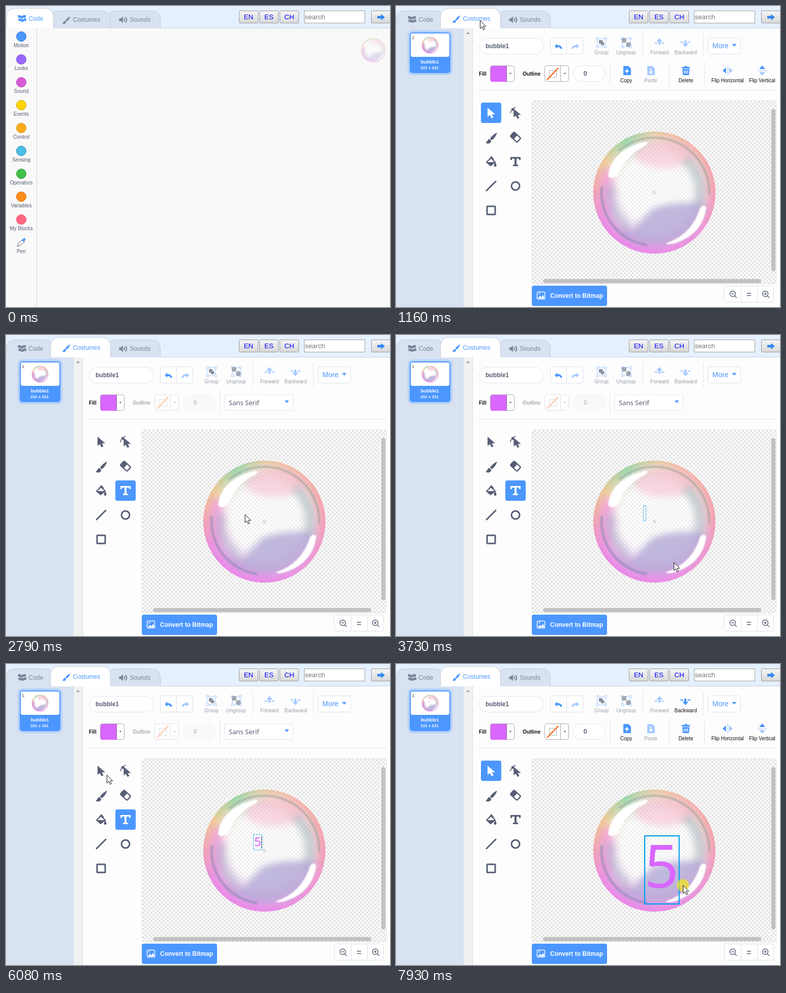
Animation of 755x592 px, one loop 8000 ms. Source, as an HTML page:

```html
<!DOCTYPE html>
<html lang="en">
<head>
<meta charset="utf-8">
<title>Costume editor</title>
<style>
  html, body { margin: 0; width: 100%; height: 100%; overflow: hidden; background: #fff; }
  svg { display: block; font-family: "Liberation Sans", Arial, sans-serif; white-space: pre; }
  .noto { font-family: "Noto Sans", "Open Sans", sans-serif; }
</style>
</head>
<body>
<svg id="stage" width="755" height="592" viewBox="0 0 755 592">
  <defs id="defs"></defs>
  <g id="page"></g>
  <g id="live"></g>
</svg>
<script>
const LOOP = 8000, BLUE = '#4c97ff', INK = '#575e75', PALE = '#a6cbff', PURPLE = '#d966ff', SELECT = '#009ff0';
const $ = id => document.getElementById(id);

// Markup helpers
const rect = (x, y, w, h, r, fill, stroke = 'none', more = '') =>
  `<rect x="${x}" y="${y}" width="${w}" height="${h}" rx="${r}" fill="${fill}" stroke="${stroke}" ${more}/>`;
const circle = (x, y, r, fill, stroke = 'none', width = 1) =>
  `<circle cx="${x}" cy="${y}" r="${r}" fill="${fill}" stroke="${stroke}" stroke-width="${width}"/>`;
const path = (d, fill, more = '') => `<path d="${d}" fill="${fill}" ${more}/>`;
const line = (d, stroke, width = 1, more = '') => path(d, 'none', `stroke="${stroke}" stroke-width="${width}" ${more}`);
const text = (x, y, s, size, fill, more = '') => `<text x="${x}" y="${y}" font-size="${size}" fill="${fill}" ${more}>${s}</text>`;
const at = (x, y, body, scale = 1, more = '') => `<g transform="translate(${x} ${y}) scale(${scale})" ${more}>${body}</g>`;
const MID = 'text-anchor="middle"', BOLD = 'font-weight="bold"';
const dashes = d => line(d, '#d0d4dc', 1, 'stroke-dasharray="3 2"');
const down = (x, y, w, fill) => path(`M${x - w} ${y - w / 2}h${2 * w}l${-w} ${w * 1.1}z`, fill);

// Bubble, centred on 0,0 with radius 120
const polar = (r, deg) => {
  const a = deg * Math.PI / 180;
  return `${(r * Math.cos(a)).toFixed(1)} ${(r * Math.sin(a)).toFixed(1)}`;
};
const arc = (r, a, b) => `M${polar(r, a)}A${r} ${r} 0 0 1 ${polar(r, b)}`;

function bubble() {
  const rim = ['#e9c39c', '#f4ae98', '#f39fa4', '#f29bb4', '#ee94cf', '#ea92e2',
    '#e98ee8', '#ea8ae8', '#ea8ee2', '#f0a2ae', '#efc690', '#92d3a0'];
  let wheel = '';
  for (let i = 0; i < 120; i++) {
    const k = Math.floor(i / 10), mix = 100 - i % 10 * 10;
    wheel += `<path d="${arc(120, i * 3 - 90, i * 3 - 86)}L0 0z" style="fill:color-mix(in srgb,${rim[k]} ${mix}%,${rim[(k + 1) % 12]})"/>`;
  }
  return `<g mask="url(#rim)">${wheel}</g>
    <g clip-path="url(#disc)"><g filter="url(#soft)">
      ${path('M-82 0a82 82 0 1 1 164 0a82 82 0 1 1 -164 0', '#fff', 'opacity=".45"')}
      <ellipse cx="22" cy="-76" rx="62" ry="28" fill="#f8b4cc" opacity=".5"/>
      <ellipse cx="-93" cy="0" rx="14" ry="48" fill="#ee86e8" opacity=".55"/>
      ${line(arc(90, -48, 22), '#9fc3c6', 20, 'opacity=".55"')}
      ${line(arc(86, 125, 190), '#b0b2cc', 22, 'opacity=".55"')}
      ${path('M-48 76L-5 32Q40 14 100 22Q84 92 10 104Q-46 104 -75 72z', '#b3a8d6', 'opacity=".8"')}
    </g><g filter="url(#thin)">
      ${line(arc(108, -130, 2), '#8c9a92', 4, 'opacity=".5"')}
      ${line(arc(104, 98, 186), '#7f8aa8', 5, 'opacity=".5"')}
      ${path('M-91-32Q-85-84-18-100Q-9-99-18-92Q-55-75-71-35Q-82-24-91-32z', '#fff')}
      ${path('M22 100Q74 83 90 30Q98 21 102 30Q95 80 45 98Q28 104 22 100z', '#fff')}
    </g></g>`;
}

$('defs').innerHTML = `
  <pattern id="checker" x="4" y="7" width="8" height="8" patternUnits="userSpaceOnUse">
    <path d="M0 0h8v8H0z" fill="#fff"/><path d="M0 0h4v8h4V4H0z" fill="#e4e4e4"/></pattern>
  <pattern id="dots" x="80" y="57" width="27" height="27" patternUnits="userSpaceOnUse">
    <path d="M0 0h2v1H0z" fill="#dedede"/></pattern>
  <linearGradient id="button" x2="0" y2="1"><stop stop-color="#f6f6f6"/><stop offset="1" stop-color="#d8d8d8"/></linearGradient>
  <radialGradient id="fade" gradientUnits="userSpaceOnUse" cx="3" cy="-8" r="130">
    <stop offset=".5" stop-color="#000"/><stop offset=".72" stop-color="#666"/>
    <stop offset=".85" stop-color="#ddd"/><stop offset=".95" stop-color="#fff"/></radialGradient>
  <mask id="rim" maskUnits="userSpaceOnUse" x="-122" y="-122" width="244" height="244">${circle(0, 0, 122, 'url(#fade)')}</mask>
  <clipPath id="disc">${circle(0, 0, 120, '#000')}</clipPath>
  <filter id="soft"><feGaussianBlur stdDeviation="7"/></filter>
  <filter id="thin"><feGaussianBlur stdDeviation="1.2"/></filter>
  <g id="bubble">${bubble()}</g>`;
const BUBBLE = '<use href="#bubble"/>';

// Icons
const blockRow = 'h4l2 1.5h3l2-1.5h4.5v5h-4.5l-2 1.5h-3l-2-1.5h-4z';
const codeIcon = c => path('M0 0' + blockRow, c) + path('M1 6.6' + blockRow, c);
const brushIcon = c => path('M15.6.4C12 2 7.3 6 6.2 8.6l2 2C11 9.5 15 4 15.6.4z', c) +
  path('M5.4 9.2c-3.2 0-2.4 4-5.4 5 3 2 7.6 1 7.7-2.6z', c);
const soundIcon = c => path('M0 4.5h3l4.5-4v13l-4.5-4H0z', c) + line('M9.7 4q2.2 3 0 6M12.6 1.5q4.4 5.5 0 11', c, 2);
const arrow = 'M-7-10V8l4.5-3.5L1 11l3.5-2L1.5 3H8z';
const tools = [
  c => path(arrow, c),
  c => at(3, 1.5, path(arrow, c), .95) + line('M-10 1Q-9-7 0-11', c, 1.5) + rect(-8, -9, 5, 5, 1, c),
  c => at(-11, -9.5, brushIcon(c), 1.45),
  c => `<g transform="rotate(42)">${rect(-9, -5.5, 18, 11, 2, '#fff', c, 'stroke-width="2.4"')}${rect(-9, -5.5, 9, 11, 1, c)}</g>`,
  c => line('M-9 1L0-7l8 8-9 7zM-4-4L1-10', c, 2.2, 'stroke-linejoin="round"') + path('M-9 1H8l-9 7z', c) +
    path('M8 1q5 9 0 9t0-9', c) + line('M0-10l5 6', c, 2),
  c => path('M-10-9h20v6H7.5l-1-3H2V6h3v3H-5V6h3V-6h-4.5l-1 3H-10z', c),
  c => line('M-9 9L9-9', c, 3, 'stroke-linecap="round"'),
  c => circle(0, 0, 8, 'none', c, 3),
  c => rect(-8, -8, 16, 16, 1, 'none', c, 'stroke-width="3"')
];
const hook = c => path('M-8 0L-3-5V-2Q5-3 7 5H3Q2 1-3 2V5z', c);
const groupIcon = (c, body) => rect(-8, -8, 16, 16, 0, 'none', c) +
  [[-8, -8], [8, -8], [-8, 8], [8, 8]].map(([x, y]) => rect(x - 2, y - 2, 4, 4, 0, '#fff', c)).join('') + body;
const shift = c => path('M0-9l6 7H2v6h-4v-6h-4z', c) + rect(-10, 0, 6, 2, 0, c) + rect(4, 0, 6, 2, 0, c);
const page = (c, mark) => path('M-7-9H3l5 5V9H-7z', c) + line(mark, '#fff', 2);

// Header
function tab(x, right, label, icon, on, hover) {
  const top = on ? 4.5 : 9.5, ink = on ? BLUE : '#7c8499', dy = on ? 0 : 2;
  const fill = on ? '#fff' : hover ? '#e3eefd' : '#d9e2f1';
  return path(`M${x} 44V${top + 18}q0-18 18-18H${right - 18}q18 0 18 18V44`, fill, 'stroke="#c3cbd8"') +
    at(x + 23, 18 + dy, icon(ink)) + text(x + 44, 29 + dy, label, 12, ink);
}

function header(costumes, hover) {
  const code = tab(.5, 93.5, 'Code', codeIcon, !costumes);
  const costume = tab(87.5, 205.5, 'Costumes', brushIcon, costumes, hover);
  const buttons = ['EN', 'ES', 'CH'].map((s, i) =>
    rect(458.5 + 40 * i, 9.5, 37, 24, 1, 'url(#button)', '#9a9a9a') + text(477 + 40 * i, 26, s, 13.33, '#00f', MID));
  return rect(0, 0, 755, 43, 0, '#e5f0ff') + line('M0 43.5H755', '#c9d0db') +
    tab(199.5, 303.5, 'Sounds', soundIcon) + (costumes ? code + costume : costume + code) + buttons.join('') +
    rect(586.5, 9.5, 119, 24, 0, '#fff', '#a0a0a0') + text(587.5, 26, 'search', 13.33, '#757575') +
    rect(718.5, 9.5, 50, 24, 1, 'url(#button)', '#9a9a9a') + path('M730 19.5h7.5V16l7.5 6-7.5 6v-3.5H730z', '#2f86f0');
}

// Pages
const categories = [['Motion', BLUE, '#3373cc'], ['Looks', '#96f', '#774dcb'], ['Sound', '#d65cd6', '#bd42bd'],
  ['Events', '#ffd500', '#cc9900'], ['Control', '#ffab19', '#cf8b17'], ['Sensing', '#4cbfe6', '#2e8eb8'],
  ['Operators', '#40bf4a', '#389438'], ['Variables', '#ff8c1a', '#db6e00'], ['My Blocks', '#ff6680', '#ff4d6a'], ['Pen']];

function codePage() {
  const menu = categories.map(([name, fill, edge], i) => at(30, 60 + 45 * i,
    (fill ? circle(0, 0, 9.5, fill, edge) : path('M-8 8l3-7L3-6l4 4L-1 5z', '#fff', `stroke="${INK}"`) + path('M1-4l5-5 3 3-5 5z', BLUE)) +
    text(0, 21, name, 10, INK, MID)));
  return rect(0, 43, 755, 549, 0, '#f9f9f9') + rect(61, 44, 694, 548, 0, 'url(#dots)') +
    line('M60.5 44V592', '#d5d5d5') + menu.join('') + at(722, 87, BUBBLE, .2, 'opacity=".4"');
}

function listPanel(edited) {
  return rect(0, 44, 133, 548, 0, '#d9e2f1') + rect(133, 44, 17, 548, 0, '#f1f1f1') + line('M150.5 44V592', '#d5dae3') +
    path('M137.5 55l4-4 4 4z', '#a3a3a3') + rect(23, 48, 88, 88, 9, '#b4d2fb') + rect(27, 52, 80, 80, 6, BLUE) +
    rect(29, 54, 76, 46, 4, '#fff') + text(31, 65, '1', 9.6, INK) + at(67, 77, BUBBLE, .1375) +
    (edited ? text(64.3, 76, '5', 3.3, PURPLE, 'class="noto"') : '') +
    text(66.5, 113, 'bubble1', 9.3, '#fff', BOLD + MID.padStart(MID.length + 1)) +
    text(66, 124, '221 x 221', 8, '#fff', `${BOLD} ${MID}`);
}

function topBar(selected) {
  const label = (x, s, fill = '#9a9ea9') => text(x, 95, s, 10, fill, MID);
  return rect(163.5, 63.5, 127, 31, 15.5, '#fff', '#e2e4e9') + text(176, 83, 'bubble1', 12, INK, BOLD) +
    rect(303.5, 62.5, 64, 32, 4, '#fff', '#dcdfe6') + line('M335.5 63v32', '#dcdfe6') +
    at(320, 79, hook(BLUE)) + at(352, 79, hook(PALE), '-1 1') +
    at(404, 72, groupIcon(PALE, rect(-5, -5, 7, 7, 0, '#8b90a0') + circle(2, 2, 3.5, '#8b90a0'))) + label(404, 'Group') +
    at(453, 72, groupIcon(PALE, rect(-9, -9, 9, 9, 2, '#a2a7b5') + circle(4, 4, 5, '#a2a7b5'))) + label(452.5, 'Ungroup') +
    dashes('M485.5 56V102M604.5 56V102') +
    at(518, 72, shift(PALE)) + label(518, 'Forward') +
    at(569, 72, shift(selected ? BLUE : PALE), '1 -1') + label(569.5, 'Backward', selected ? '#111' : undefined) +
    rect(613.5, 62.5, 64, 32, 4, '#fff', '#dcdfe6') + text(622, 83, 'More', 14, BLUE) + down(665, 77, 4.5, BLUE);
}

function optionBar(typing) {
  const label = (x, s, fill = '#111') => text(x, 150, s, 10, fill, MID);
  const outline = text(249, 137, 'Outline', 10.2, '#111', BOLD) + rect(292.5, 117.5, 47, 31, 4, '#fff', '#aaa') +
    line('M323.5 118v31', '#aaa') + rect(301.5, 126.5, 14, 14, 0, '#fff', '#b5b5b5') +
    line('M297 145L319 122', '#ff661a', 2.5) + down(332, 133, 2.5, INK) +
    rect(348.5, 117.5, 63, 31, 15.5, typing ? '#f0f0f0' : '#fff', '#e2e4e9') + text(372, 137, '0', 12, INK, `${BOLD} ${MID}`);
  const bin = path('M-8-7h5l1-2h4l1 2h5v3H-8zM-7-3H7L6 9H-6z', BLUE) + line('M-3 0v6M0 0v6M3 0v6', '#fff', 1.4);
  const flip = path('M-3-6v12l-7-6z', BLUE) + path('M3-6v12l7-6z', PALE) + line('M.5-9v18', BLUE, 1, 'stroke-dasharray="2 2"');
  const font = rect(429.5, 117.5, 135, 31, 4, '#fff', '#e2e4e9') +
    text(438, 138, 'Sans Serif', 13, INK, 'class="noto"') + down(552, 131, 4.5, BLUE);
  const actions = at(454, 127, page(BLUE, 'M0-3v8M-4 1h8')) + label(452.5, 'Copy') +
    at(501, 127, page(PALE, 'M0-4v8M-3 2l3 3 3-3')) + label(501, 'Paste', '#9a9ea9') + at(570, 127, bin) + label(570, 'Delete') +
    at(652, 127, flip) + label(652, 'Flip Horizontal') + `<g transform="translate(720 127) rotate(90)">${flip}</g>` +
    label(720, 'Flip Vertical') + dashes('M537.5 110V156M606.5 110V156');
  return text(163, 137, 'Fill', 10.2, '#111', BOLD) + rect(185.5, 117.5, 47, 31, 4, '#fff', '#aaa') +
    path('M186 121q0-3 3-3h28v31h-28q-3 0-3-3z', PURPLE) + line('M217.5 118v31', '#8d6a9c') + down(225, 133, 2.5, INK) +
    `<g opacity="${typing ? .35 : 1}">${outline}</g>` + dashes('M420.5 110V156M163 165.5H748') + (typing ? font : actions);
}

function costumePage(tool, selected) {
  const grid = tools.map((icon, i) => at(187 + 48 * (i % 2), 210 + 48 * Math.floor(i / 2),
    i === tool ? rect(-20, -20, 40, 40, 4, BLUE) + icon('#fff') : icon(INK)));
  const glass = circle(0, -1, 5.5, 'none', INK, 1.4) + line('M4 3l4 4M-2.5-1h5', INK, 1.4);
  return rect(0, 44, 755, 548, 0, '#fdfdfd') + listPanel(selected) + topBar(selected) + optionBar(tool === 5) + grid.join('') +
    rect(267.5, 186.5, 480, 360, 4, 'url(#checker)', '#e3e3e3') + at(508, 367, BUBBLE) +
    at(508, 367, circle(0, 0, 3, 'none', '#bbb') + line('M-4 0h8M0-4v8', '#bbb'), 1, 'opacity=".6"') +
    rect(738, 203, 8, 319, 4, '#c1c1c1') + rect(289, 537, 429, 8, 4, '#c1c1c1') +
    rect(267, 550, 148, 40, 4, BLUE) + rect(277.5, 562.5, 15, 14, 2, 'none', '#fff', 'stroke-width="1.4"') +
    path('M279 575l4-5 3 3 3-5 3 7z', '#fff') + circle(282, 566, 1.3, '#fff') + text(303, 574, 'Convert to Bitmap', 12, '#fff', BOLD) +
    rect(645.5, 550.5, 97, 32, 4, '#fff', '#dcdfe6') + line('M678.5 551v32M710.5 551v32', '#dcdfe6') +
    at(662, 567, glass) + at(726, 567, glass + line('M0-3.5v5', INK, 1.4)) + line('M690 565h8M690 569.5h8', INK, 1.5);
}

// Pointer path: time, x, y
const moves = [[40, 640, 556], [790, 165, 28], [1420, 165, 28], [2090, 239, 303], [2360, 239, 303], [2880, 489, 357],
  [3510, 489, 357], [3730, 546, 447], [3970, 646, 453], [4090, 646, 453], [4280, 655, 457], [4680, 655, 457],
  [5520, 193, 215], [5605, 193, 215], [5610, 187, 214], [5905, 187, 214], [5910, 233, 235], [6075, 233, 235],
  [6080, 198, 218], [6770, 506, 361], [6915, 506, 361], [6920, 505, 361], [7145, 505, 361], [7150, 503, 361],
  [7440, 503, 361], [7930, 564, 435]];
const clicks = [[860, 1010], [2240, 2330], [3180, 3260], [5860, 5910], [7470, LOOP]];
const ease = p => { p = Math.min(1, Math.max(0, p)); return p * p * (3 - 2 * p); };

function pointer(t) {
  const i = moves.findIndex(m => m[0] > t);
  if (i < 0) return moves.at(-1).slice(1);
  const [t0, x0, y0] = moves[i - 1], [t1, x1, y1] = moves[i], p = ease((t - t0) / (t1 - t0));
  return [x0 + (x1 - x0) * p, y0 + (y1 - y0) * p];
}

function editing(t) {
  const typed = t >= 4510, end = typed ? 502.5 : 489.5;
  const caret = Math.floor((t - (typed ? 4465 : 3170)) / (typed ? 541 : 530)) % 2 === 0;
  return rect(486.5, 335.5, typed ? 17 : 5, 30, 0, 'none', SELECT, 'stroke-dasharray="3 2"') +
    (typed ? text(488, 358, '5', 24.2, PURPLE, 'class="noto"') : '') + (caret ? line(`M${end} 339v24`, '#777') : '');
}

function selection(t, x) {
  const drag = t >= 7470, scale = 1 + 3.87 * ease((t - 7440) / 490);
  const size = 24.2 * scale, w = 13.9 * scale, h = 27.5 * scale;
  let out = text(488.5, 338 + .864 * size, '5', size, PURPLE, 'class="noto"');
  if (!drag && x > 392) out += rect(388, 247, 240, 240, 0, 'none', SELECT);
  out += rect(489, 338, w, h, 0, 'none', SELECT, `stroke-width="${drag ? 2.2 : 1.2}"`);
  if (drag) return out;
  for (let i = 0; i < 9; i++) if (i !== 4)
    out += circle(489 + w * (i % 3) / 2, 338 + h * Math.floor(i / 3) / 2, 4, SELECT, '#fff');
  return out + line('M488 382q7 7 15 0M488 386v-4h4M503 386v-4h-4', SELECT, 1.8);
}

function cursor(t) {
  if (t < 70) return '';
  const [x, y] = pointer(t);
  const glow = clicks.some(([a, b]) => t >= a && t < b) ? circle(0, 0, 12, 'rgba(255,238,0,.62)') : '';
  return at(x, y, glow + path('M.5.5V16.3l3.7-3.5 2.4 5.9 2.7-1.1-2.5-5.7h4.9z', '#fff', 'stroke="#111"'));
}

let shown;
function draw() {
  const t = performance.now() % LOOP;
  const costumes = t >= 1160, hover = t >= 1010, selected = t >= 6160;
  const tool = t >= 2330 && !selected ? 5 : 0;
  const state = [costumes, hover, tool, selected].join();
  if (state !== shown) {
    shown = state;
    $('page').innerHTML = (costumes ? costumePage(tool, selected) : codePage()) + header(costumes, hover);
  }
  $('live').innerHTML = (selected ? selection(t, pointer(t)[0]) : t >= 3260 ? editing(t) : '') + cursor(t);
  requestAnimationFrame(draw);
}
draw();
</script>
</body>
</html>
```
